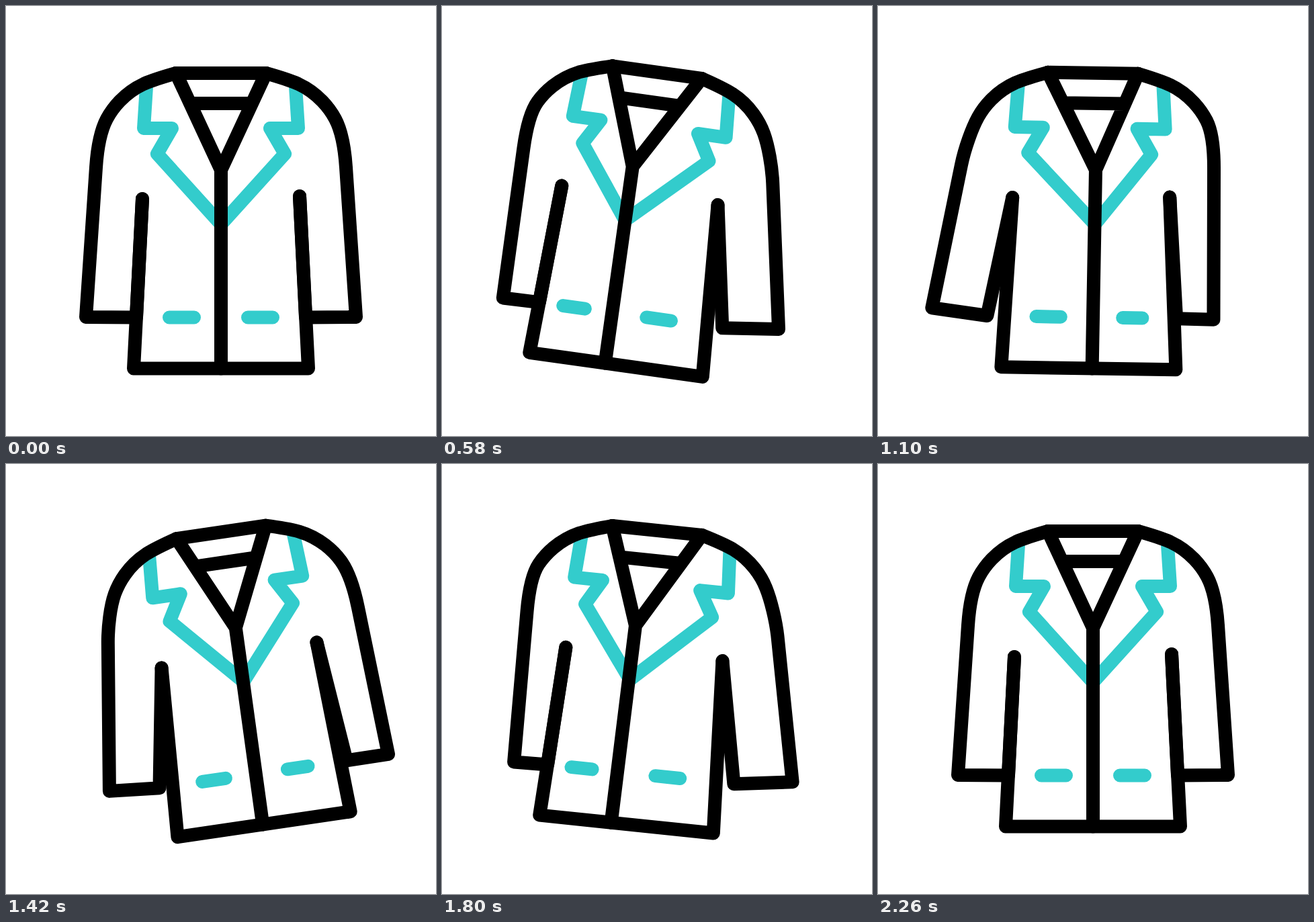
An HTML page for the animation above (2.42 s loop, 640 px wide and 640 px high).

```html
<!DOCTYPE html>
<html lang="en">
<head>
<meta charset="utf-8">
<title>Swinging jacket</title>
<style>
html, body { margin: 0; width: 100%; height: 100%; overflow: hidden; background: #fff; }
svg { display: block; width: 100vw; height: 100vh; }
path { fill: none; stroke: #000; stroke-width: 20; stroke-linejoin: round; stroke-linecap: round; }
.trim { stroke: #3cc; }
</style>
</head>
<body>
<svg viewBox="0 0 640 640">
  <g id="coat">
    <path id="lapels" class="trim"/>
    <path id="pockets" class="trim"/>
    <path id="leftArm"/>
    <path id="rightArm"/>
    <path id="front"/>
    <path d="M203 287L190 539.5H450L437 283M253 100H387"/>
  </g>
</svg>
<script>
const LOOP = 2420;
const SWING = [215, 810, 1370, 1840, 2260];
const FOLLOW = [215, 720, 1217, 1740, 2200];
const el = id => document.getElementById(id);

// Sine-eased value between key times; the track starts and ends at zero.
function track(times, peaks, t) {
  const values = [0, ...peaks, 0];
  if (t <= times[0] || t >= times[4]) return 0;
  const i = times.findIndex(k => k > t) - 1;
  const u = (t - times[i]) / (times[i + 1] - times[i]);
  return values[i] + (values[i + 1] - values[i]) * (1 - Math.cos(Math.PI * u)) / 2;
}

// One sleeve; side is -1 for left and 1 for right, offsets point outward.
function sleeve(side, outer, inner, pitY) {
  const p = (x, y) => `${320 + side * x} ${y}`;
  const handX = 201 + outer, handY = 463 - outer * (outer > 0 ? 0.3 : 0.07);
  const elbowX = 186 + outer * 0.24, elbowY = 240;
  const bendX = elbowX - 0.117 * (handX - elbowX);
  const bendY = elbowY - 0.117 * (handY - elbowY);
  return `M${p(67, 100)}C${p(67, 100)} ${p(99, 109)} ${p(115, 116)}` +
    `C${p(145, 130)} ${p(162, 153)} ${p(170, 168)}` +
    `C${p(179, 185)} ${p(bendX, bendY)} ${p(elbowX, elbowY)}` +
    `L${p(handX, handY)}L${p(126 + inner, 463.5)}L${p(117, pitY)}`;
}

function draw(t) {
  const follow = (...peaks) => track(FOLLOW, peaks, t);
  const seam = 320 + follow(-20, 10, -18);
  const hem = 320 + follow(-20, 9, -24);
  const shift = follow(0, -7, 0);
  const neck = 45 / 144;

  el("coat").setAttribute("transform", `rotate(${track(SWING, [11.8, -8.8, 6.2], t)} 330 100)`);
  el("leftArm").setAttribute("d", sleeve(-1, follow(-25, 42, -26), follow(0, 30, 0), 287));
  el("rightArm").setAttribute("d", sleeve(1, follow(38, -24, 40), follow(28, 0, 28), 283));
  el("front").setAttribute("d",
    `M253 100L${seam} 244L387 100M${seam} 244L${hem} 539.5` +
    `M${253 + neck * (seam - 253)} 145H${387 - neck * (387 - seam)}`);
  el("lapels").setAttribute("d",
    `M209 120L205 182H247L225 220L${seam} 325` +
    `L${415 + shift} 220L${393 + shift} 182H${435 + shift}L${431 + shift} 120`);
  el("pockets").setAttribute("d",
    `M${243 + follow(-16, 0, -14)} 463.5H${280 + follow(-21, 0, -20)}` +
    `M${360 + follow(-6, 12, -5)} 463.5H${397 + follow(-6, 3, -5)}`);
}

function frame() {
  draw(performance.now() % LOOP);
  requestAnimationFrame(frame);
}
frame();
</script>
</body>
</html>
```
